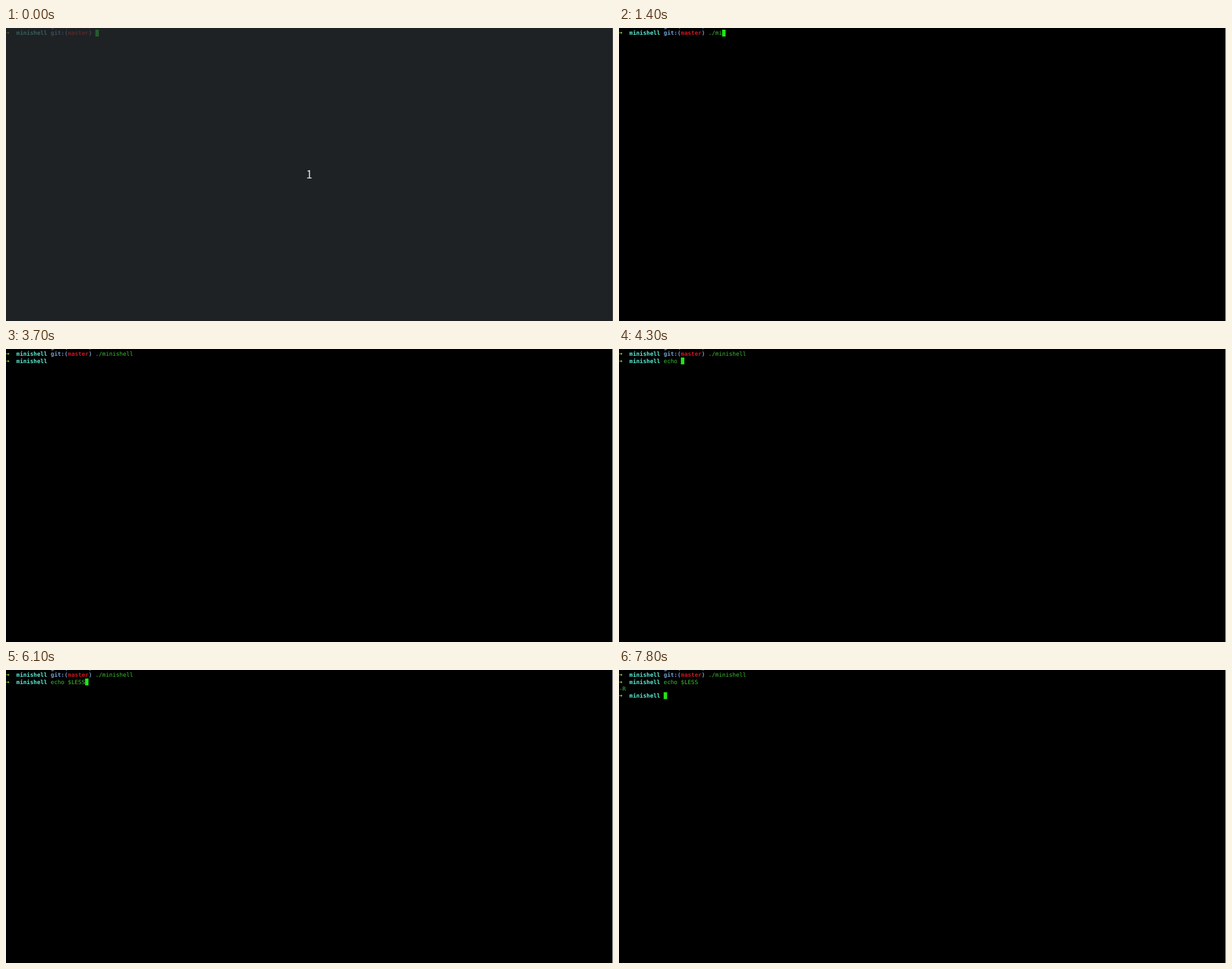
Recreate the animation shown at these times as an HTML page with a canvas. Size 1077 px wide and 520 px high, loop 8 s.

```html
<!DOCTYPE html>
<html lang="en">
<head>
<meta charset="utf-8">
<title>Terminal session</title>
<style>
  html, body { margin: 0; width: 100%; height: 100%; overflow: hidden; background: #000; }
  canvas { display: block; }
</style>
</head>
<body>
<canvas id="stage" width="1077" height="520"></canvas>
<script>
const W = 1077, H = 520, LOOP = 8000;
const CELL_W = 6.1, LINE_H = 12.15, TOP = 3, ASCENT = 9.4;
const MONO = '10.13px "DejaVu Sans Mono", monospace';
const COLOR = {
  text: '#3bbf30', cursor: '#20e616', arrow: '#8ae234',
  dir: '#5cebd3', git: '#729fcf', branch: '#d0161f'
};
const PROMPT_COL = 13, GIT_PROMPT_COL = 26;

// Each entry: time, text typed so far on the active line
const COMMAND = [
  [600, '.'], [800, './'], [1300, './m'], [1400, './mi'], [1700, './min'],
  [1800, './mini'], [2100, './minis'], [2300, './minish'], [2400, './minishe'],
  [2600, './minishel'], [2700, './minishell']
];
const ECHO = [
  [3800, 'e'], [4000, 'ec'], [4100, 'echo'], [4300, 'echo '], [5000, 'echo $'],
  [5600, 'echo $L'], [5700, 'echo $LE'], [6000, 'echo $LES'], [6100, 'echo $LESS']
];
const COUNTDOWN_END = 500, RUN = 3000, OUTPUT = 6600;
// Spans in which the cursor is blinked off
const CURSOR_OFF = [[500, 600], [3700, 3800], [7200, 7800]];

const ctx = document.getElementById('stage').getContext('2d');
ctx.textRendering = 'geometricPrecision';

function typed(steps, t) {
  let text = '';
  for (const [at, value] of steps) if (t >= at) text = value;
  return text;
}

function write(row, col, text, color, bold) {
  ctx.font = (bold ? 'bold ' : '') + MONO;
  ctx.fillStyle = color;
  const y = TOP + row * LINE_H + ASCENT;
  [...text].forEach((ch, i) => {
    if (ch !== ' ') ctx.fillText(ch, (col + i) * CELL_W, y);
  });
}

function prompt(row, withGit) {
  write(row, 0, '➜', COLOR.arrow, true);
  write(row, 3, 'minishell', COLOR.dir, true);
  if (!withGit) return;
  write(row, 13, 'git:(', COLOR.git, true);
  write(row, 18, 'master', COLOR.branch, true);
  write(row, 24, ')', COLOR.git, true);
}

function cursor(row, col, t) {
  if (CURSOR_OFF.some(([from, to]) => t >= from && t < to)) return;
  ctx.fillStyle = COLOR.cursor;
  ctx.fillRect(col * CELL_W, TOP + row * LINE_H, CELL_W, LINE_H);
}

function countdown() {
  ctx.fillStyle = 'rgba(40, 46, 49, 0.75)';
  ctx.fillRect(0, 0, W, H);
  ctx.font = '20px "Noto Sans CJK SC", "Noto Sans CJK JP", "Noto Sans CJK", sans-serif';
  ctx.fillStyle = '#e6e6e6';
  ctx.textAlign = 'center';
  ctx.fillText('1', 538, 267);
  ctx.textAlign = 'left';
}

function draw(t) {
  ctx.fillStyle = '#000';
  ctx.fillRect(0, 0, W, H);

  // The line scrolled off the top shows only its descenders
  prompt(-1, true);
  prompt(0, true);
  const command = typed(COMMAND, t);
  write(0, GIT_PROMPT_COL, command, COLOR.text);

  if (t < RUN) {
    cursor(0, GIT_PROMPT_COL + command.length, t);
  } else {
    const echo = typed(ECHO, t);
    prompt(1);
    write(1, PROMPT_COL, echo, COLOR.text);
    if (t < OUTPUT) {
      cursor(1, PROMPT_COL + echo.length, t);
    } else {
      write(2, 0, '-R', COLOR.text);
      prompt(3);
      cursor(3, PROMPT_COL, t);
    }
  }

  ctx.fillStyle = '#e8e8e8';
  ctx.fillRect(1076, 0, 1, H);
  if (t < COUNTDOWN_END) countdown();
}

const start = performance.now();
function tick() {
  draw((performance.now() - start) % LOOP);
  requestAnimationFrame(tick);
}
tick();
</script>
</body>
</html>
```
